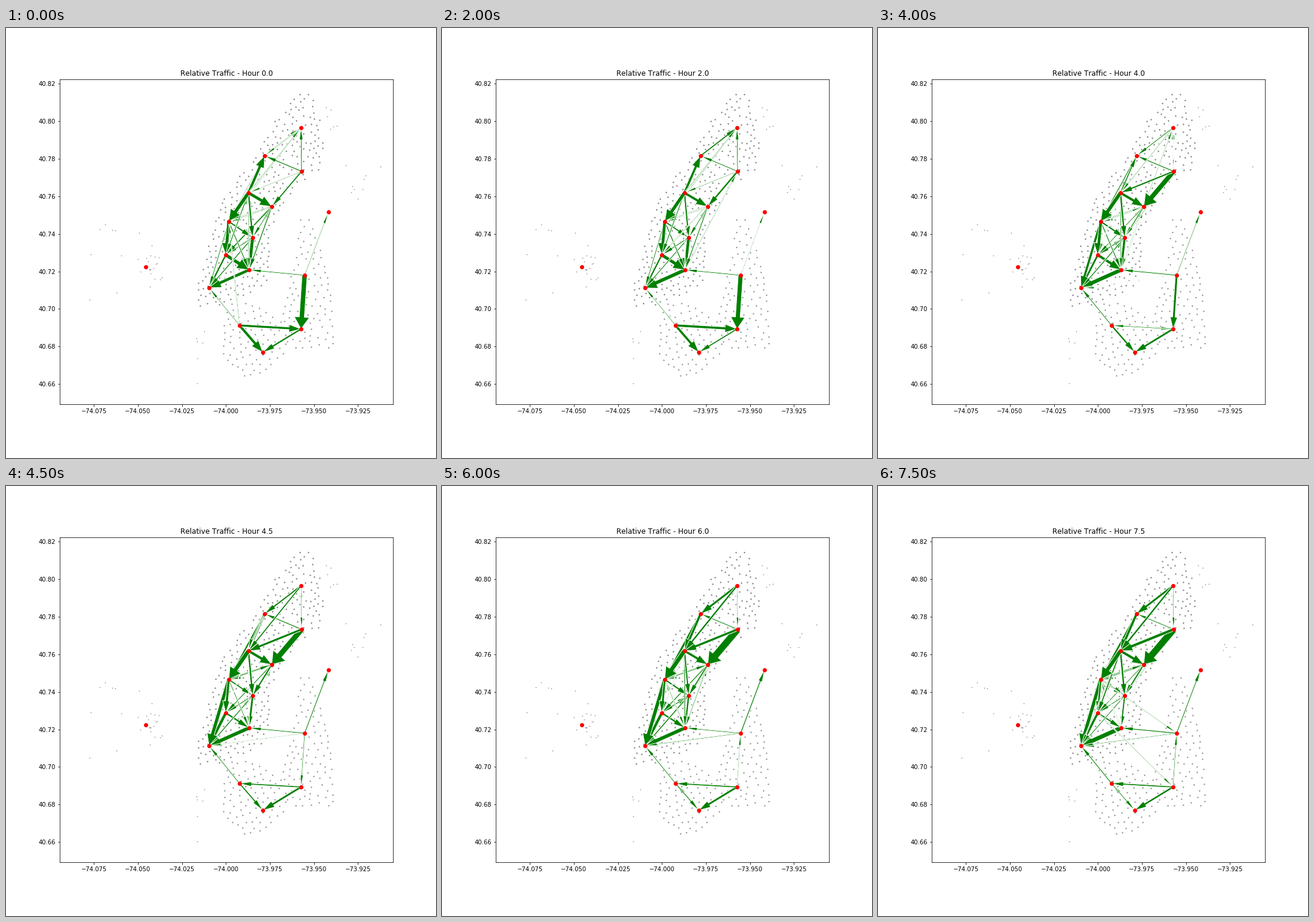
These frames come from a looping animation (720 by 720 pixels, 8 s). A matplotlib script:

```python
import numpy as np
import matplotlib.pyplot as plt
from matplotlib.animation import FuncAnimation
from matplotlib.collections import PolyCollection

FRAMES, STEP = 16, 0.5
HEAD = 20
rng = np.random.default_rng(12)

# Hubs in stage pixels; dictionary order is the stacking order of the arrows.
HUBS = {
    "J": (340, 435), "O": (430, 543), "I": (407, 405), "H": (368, 380),
    "G": (413, 351), "E": (445, 299), "F": (373, 324), "M": (391, 498),
    "N": (494, 504), "K": (500, 414), "L": (540, 308), "B": (433, 214),
    "D": (406, 276), "C": (495, 240), "A": (494, 167),
}
HUBS = {k: np.array(v, float) for k, v in HUBS.items()}
LONE = (234, 400)
CENTRE = "DEFGHIJ"

# Arrow width -> directed hub pairs, for the night and for the morning.
NIGHT = {9: "KN", 6: "DF FH IJ GI HI", 5: "MN MO DB DE",
         3: "BA EF CE FG NO HJ DG",
         2: "CA CB EG FJ KI DH FI GJ GH EI", 1.4: "DA FA KL MJ CD"}
MORNING = {12: "CE", 7: "IJ DF FJ", 5: "BD CD DE HJ", 4: "AB NO FH EF BF",
           3: "AD NM GI HI EG DG FG",
           2: "KL MO MJ CB KI OM IE GJ GH EH FE", 1.4: "KJ AC NK CA"}


def by_pair(classes):
    return {p: w for w, names in classes.items() for p in names.split()}


def gap(a, b):
    return np.hypot(*(HUBS[a] - HUBS[b]))


NIGHT, MORNING = by_pair(NIGHT), by_pair(MORNING)
PAIRS = [a + b for a in HUBS for b in HUBS if a != b]
LOCAL = np.array([a in CENTRE and b in CENTRE and gap(a, b) < 130
                  for a, b in PAIRS])
REACH = np.array([gap(a, b) < 190 and "L" not in a + b for a, b in PAIRS])

# Per-hour variation: small local flows, rare longer trips, uneven volume.
shape = (FRAMES, len(PAIRS))
STRAY = LOCAL * (0.1 + 2.8 * rng.random(shape) ** 2)
STRAY = np.maximum(STRAY, REACH * (rng.random(shape) < 0.06) * 1.3)
VOLUME = rng.uniform(0.85, 1.15, shape)


def widths(i):
    t = np.clip((i * STEP - 3) / 2, 0, 1)
    t = t * t * (3 - 2 * t)
    main = np.array([NIGHT.get(p, 0) * (1 - t) + MORNING.get(p, 0) * t
                     for p in PAIRS])
    return np.maximum(main * VOLUME[i], STRAY[i])


def arrow(a, b, w):
    u = (b - a) / np.hypot(*(b - a))
    n = np.array([-u[1], u[0]])
    neck, s, h = b - u * HEAD, n * w / 2, n * min(3 * w, 28) / 2
    return [a + s, neck + s, neck + h, b, neck - h, neck - s, a - s]


def fill_region(ys, left, right, space, tries=4000):
    """Random points between two edges, kept at least space apart."""
    kept = np.empty((0, 2))
    for x, y in rng.uniform((min(left), ys[0]), (max(right), ys[-1]), (tries, 2)):
        inside = np.interp(y, ys, left) < x < np.interp(y, ys, right)
        if inside and (np.hypot(*(kept - (x, y)).T) > space).all():
            kept = np.vstack([kept, (x, y)])
    return kept


def lon_x(v):
    return 368.2 + (v + 74) * 2947


def lat_y(v):
    return 93.2 + (40.82 - v) * 3143.75


plt.rcParams["font.family"] = "DejaVu Sans"
plt.rcParams["text.kerning_factor"] = 6
fig = plt.figure(figsize=(10, 10), dpi=72, facecolor="white")
ax = fig.add_axes([0.125, 0.125, 0.775, 0.755])
ax.set_xlim(90, 648)
ax.set_ylim(630, 86.4)
lons = np.arange(-74.075, -73.92, 0.025)
lats = np.arange(40.66, 40.83, 0.02)
ax.set_xticks(lon_x(lons), [f"{v:.3f}".replace("-", "\u2212") for v in lons])
ax.set_yticks(lat_y(lats), [f"{v:.2f}" for v in lats])
ax.tick_params(labelsize=10)
title = ax.set_title("", fontsize=12)


def dots(pts, size):
    ax.plot(*pts.T, "o", color="gray", ms=size, mew=1, zorder=1)


# Stations: the long island, the east strip and the south side.
dots(fill_region([110, 170, 230, 285, 340, 430, 466],
                 [488, 438, 402, 362, 345, 320, 322],
                 [512, 530, 532, 468, 442, 437, 355], 7.6), 1.4)
dots(fill_region([320, 390, 460, 535], [492, 485, 462, 470],
                 [507, 535, 546, 550], 9.5), 1.2)
dots(fill_region([460, 500, 545, 585], [375, 358, 360, 400],
                 [410, 475, 465, 430], 9.5), 1.2)

# Sparse outskirts: centre, spread, count.
for centre, spread, count in [((245, 400), (16, 24), 21),
                              ((165, 400), (28, 35), 8),
                              ((595, 255), (20, 18), 9),
                              ((540, 150), (12, 24), 6),
                              ((325, 540), (16, 28), 6)]:
    dots(rng.normal(centre, spread, (count, 2)), 0.6)

arrows = PolyCollection([], facecolors="green", edgecolors="white",
                        linewidths=1, joinstyle="miter", zorder=2)
ax.add_collection(arrows, autolim=False)
ax.plot(*np.array(list(HUBS.values()) + [LONE]).T, "o", color="red",
        ms=6, mew=1, zorder=3)


def draw(i):
    arrows.set_verts([arrow(HUBS[a], HUBS[b], w)
                      for (a, b), w in zip(PAIRS, widths(i)) if w > 0])
    title.set_text(f"Relative Traffic - Hour {i * STEP:.1f}")
    return arrows, title


anim = FuncAnimation(fig, draw, frames=FRAMES, interval=500, repeat=True,
                     repeat_delay=0, blit=False)
plt.show()
```
